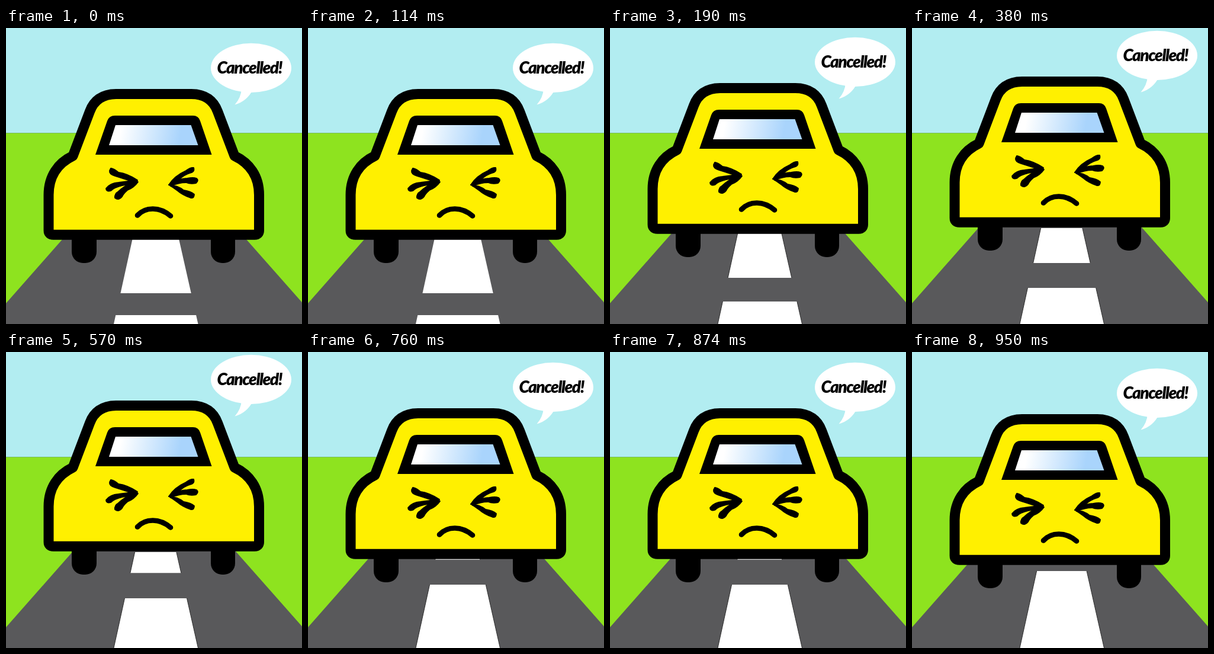
An HTML page that plays this animation: 500 by 500 pixels, repeating every 1.14 s.

```html
<!DOCTYPE html>
<html lang="en">
<head>
<meta charset="utf-8">
<title>Cancelled trip</title>
<style>
  html, body { margin: 0; width: 100%; height: 100%; overflow: hidden; }
  svg { display: block; width: 100%; height: 100%; }
  text { font: italic 900 28px Lato, "Open Sans", sans-serif; letter-spacing: -1.5px; }
</style>
</head>
<body>
<svg viewBox="0 0 500 500">
  <defs>
    <linearGradient id="glass" x1="0" x2="1" y1="0" y2="0.04">
      <stop offset="0.14" stop-color="#fff"/>
      <stop offset="0.82" stop-color="#a9d4fc"/>
    </linearGradient>
  </defs>

  <rect width="500" height="177" fill="#b2edf1"/>
  <rect y="177" width="500" height="323" fill="#8ee31f"/>
  <path d="M0 177.5H500" stroke="#79bd62"/>
  <path d="M0 465L119 330H382L500 463.5V500H0Z" fill="#59595b"/>
  <path id="dashes" fill="#fff"/>
  <path id="edges" fill="none" stroke="#222" stroke-width="0.9"/>

  <g id="car">
    <rect x="111" y="330" width="42" height="67" rx="19"/>
    <rect x="346" y="330" width="41" height="67" rx="19"/>
    <path fill="#fff000" stroke="#000" stroke-width="17" stroke-linejoin="round"
      d="M72 342V282C72 250 88 228 113 216L141.5 141C148 123 162 111.5 186 111.5H313
         C337 111.5 351 123 357.5 141L386 216C411 228 427.5 250 427.5 282V342
         Q427.5 349.2 420 349.2H80Q72 349.2 72 342Z"/>
    <path d="M151 214L171 157Q174 148 184 148H316Q325 148 328 157L347.5 214Z"/>
    <path d="M185 164H312.5L324.5 198H174Z" fill="url(#glass)"/>

    <!-- squeezed eyes -->
    <g stroke="#000" stroke-width="1.8" stroke-linejoin="round">
      <path d="M177 237Q183 238 190 244Q205 246 222 257L221 262Q200 255 184 250Q174 247 175 241Z"/>
      <path d="M169 271Q176 262 190 261L214 258L218 262L196 266Q183 269 177 275Q169 277 169 271Z"/>
      <path d="M184 287Q183 280 190 276Q200 266 219 258L223 260Q216 270 205 274Q198 280 196 285Q190 292 184 287Z"/>
      <path d="M275 265Q284 250 304 241Q312 235 317 236Q319 241 314 244Q300 248 293 256Q288 262 275 265Z"/>
      <path d="M277 264Q292 254 306 254Q316 252 322 254Q326 258 321 262Q312 264 304 261Q292 261 278 267Z"/>
      <path d="M275 265Q290 266 300 274Q312 276 318 281Q318 288 312 287Q298 282 290 275Q282 269 275 265Z"/>
    </g>

    <path d="M222 316.5Q232 305.5 248 305.5Q264 305.5 278 317.5" fill="none" stroke="#000" stroke-width="8.6" stroke-linecap="round"/>

    <ellipse cx="414" cy="67.4" rx="68" ry="41.6" fill="#fff"/>
    <path d="M398 102Q397 118 386.5 129.5Q407 124 417 104Z" fill="#fff"/>
    <text x="356.5" y="77">Cancelled!</text>
  </g>
</svg>
<script>
  const STEP = 190, STEPS = 6;
  const bounce = [0, -10, -21, -21, -8, 2];
  const $ = id => document.getElementById(id);

  // Both dash sides run towards the vanishing point.
  const left = y => 182 - 0.22 * (y - 500);
  const right = y => 324.5 + 0.226 * (y - 500);
  const dash = (a, b) => `M${left(a)} ${a}H${right(a)}L${right(b)} ${b}H${left(b)}Z`;
  const sides = (a, b) => `M${left(a)} ${a}L${left(b)} ${b}M${right(a)} ${a}L${right(b)} ${b}`;

  function draw(ms) {
    const k = Math.floor(ms / STEP) % STEPS;
    const nearTop = 485 - 23 * k;
    const farEnd = 448 - 26.7 * k + 0.6 * k * k;
    const spans = [[nearTop, 500]];
    if (farEnd > 338) spans.push([338, farEnd]);

    const join = shape => spans.map(s => shape(...s)).join("");
    $("dashes").setAttribute("d", join(dash));
    $("edges").setAttribute("d", k ? join(sides) : "");
    $("car").setAttribute("transform", `translate(0 ${bounce[k]})`);
  }

  const start = performance.now();
  function tick() {
    draw(performance.now() - start);
    requestAnimationFrame(tick);
  }
  tick();
</script>
</body>
</html>
```
